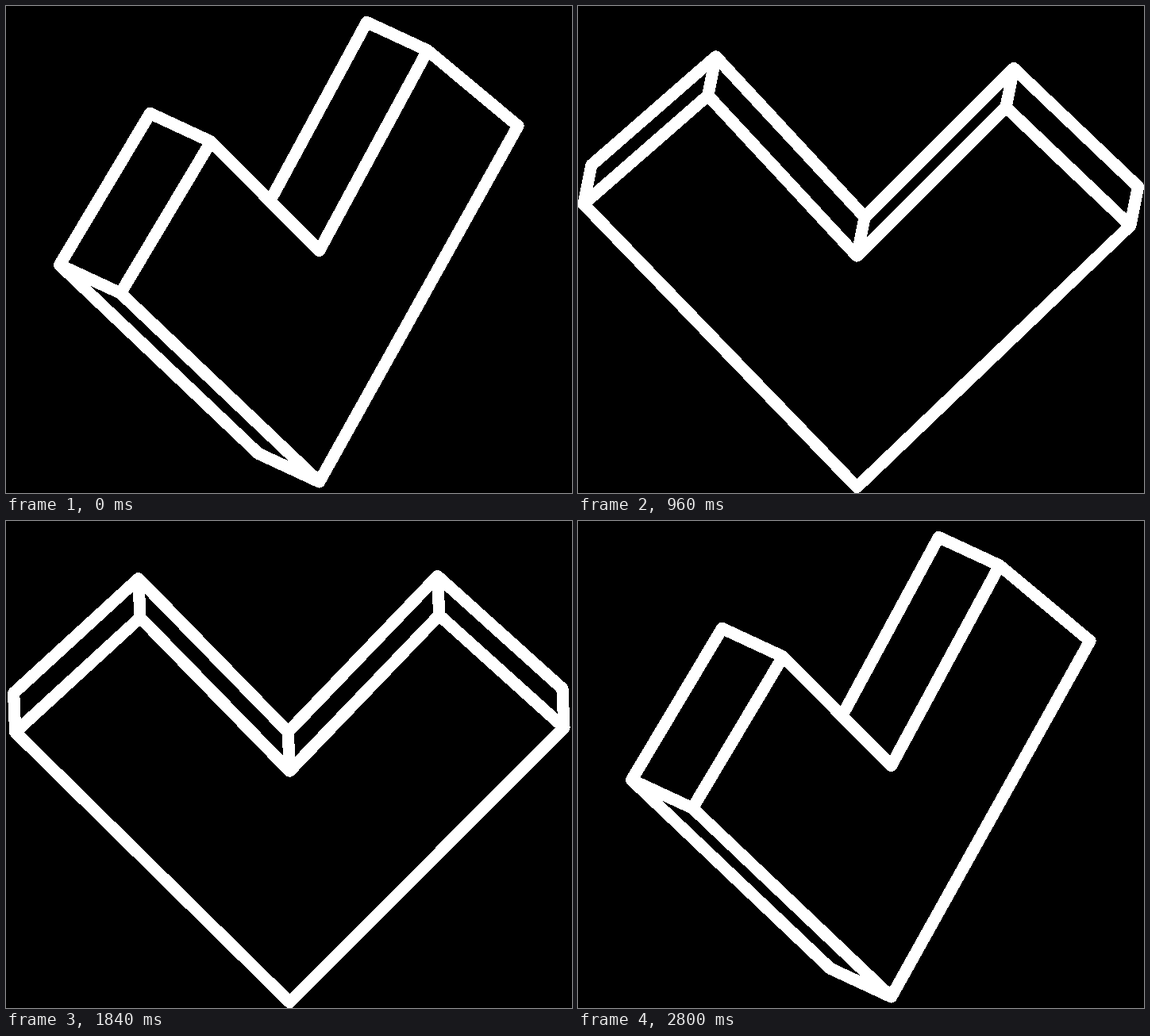
An HTML page that plays this animation: 713x614 px, repeating every 2.84 s.

```html
<!DOCTYPE html>
<html lang="en">
<head>
<meta charset="utf-8">
<title>Turning heart</title>
<style>
  html, body { margin: 0; width: 100%; height: 100%; overflow: hidden; background: #000; }
  svg { display: block; width: 713px; height: 614px; }
  path { fill: #000; stroke: #fff; stroke-width: 15.2; stroke-linejoin: round; }
</style>
</head>
<body>
<svg viewBox="0 0 713 614" shape-rendering="crispEdges"><g id="solid"></g></svg>
<script>
const LOOP = 2840, STEP = 40, TURN = 2800;
const START = 43.6, CX = 356.3, HALF = 55.6;
const TILT = 26.25 * Math.PI / 180;
const SIN = Math.sin(TILT), COS = Math.cos(TILT);

// Heart outline, clockwise: x from the axis, y as seen on the stage.
const outline = [
  [-188.4, 95.7], [0, 290.6], [188.4, 95.7],
  [345.7, 238.8], [0, 582.1], [-345.7, 238.8]
];

const group = document.getElementById('solid');
const paths = Array.from({ length: outline.length + 1 }, () =>
  group.appendChild(document.createElementNS('http://www.w3.org/2000/svg', 'path')));

// Cubic timing curve (x1, 0, x2, 1), solved by bisection.
function ease(t, x1 = 0.4195, x2 = 0.3195) {
  if (t <= 0 || t >= 1) return t <= 0 ? 0 : 1;
  let lo = 0, hi = 1, s;
  for (let i = 0; i < 40; i++) {
    s = (lo + hi) / 2;
    const r = 1 - s;
    const x = 3 * r * r * s * x1 + 3 * r * s * s * x2 + s * s * s;
    if (x < t) lo = s; else hi = s;
  }
  return s * s * (3 - 2 * s);
}

function project(x, y, z, c, s) {
  const near = z * c - x * s;
  return {
    x: CX + x * c + z * s,
    y: y + near * SIN,
    depth: near * COS - y * SIN / COS
  };
}

const toPath = pts =>
  'M' + pts.map(p => p.x.toFixed(2) + ' ' + p.y.toFixed(2)).join('L') + 'Z';

function draw(time) {
  const step = Math.floor((time % LOOP) / STEP) * STEP;
  const angle = (START + 360 * ease(step / TURN)) * Math.PI / 180;
  const c = Math.cos(angle), s = Math.sin(angle);
  const cap = z => outline.map(([x, y]) => project(x, y, z, c, s));
  const front = cap(HALF), back = cap(-HALF);

  const walls = [];
  front.forEach((a, i) => {
    const j = (i + 1) % front.length;
    const b = front[j], d = back[i];
    const facing = (b.x - a.x) * (d.y - a.y) - (b.y - a.y) * (d.x - a.x);
    if (facing < 0) {
      const pts = [a, b, back[j], d];
      walls.push({ pts, depth: pts.reduce((sum, p) => sum + p.depth, 0) });
    }
  });
  walls.sort((a, b) => a.depth - b.depth);

  // The cap that faces the viewer lies in front of every wall.
  const faces = [...walls.map(w => w.pts), c > 0 ? front : back];
  paths.forEach((p, i) => p.setAttribute('d', faces[i] ? toPath(faces[i]) : ''));
}

const begin = performance.now();
function tick() {
  draw(performance.now() - begin);
  requestAnimationFrame(tick);
}
tick();
</script>
</body>
</html>
```
